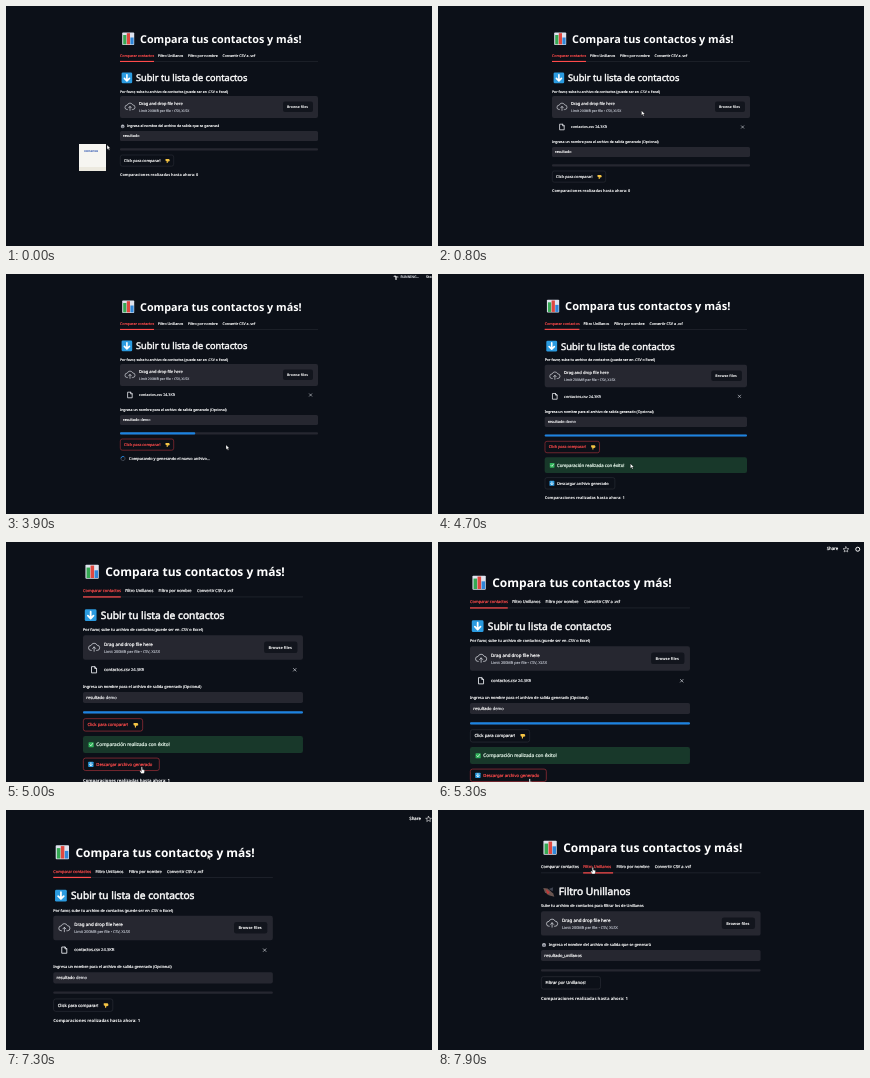
Animation of 426x240 px, one loop 8 s. Source, as an HTML page:

```html
<!DOCTYPE html>
<html lang="es">
<head>
<meta charset="utf-8">
<title>Compara tus contactos</title>
<style>
  html, body { margin: 0; width: 100%; height: 100%; overflow: hidden; background: #0c1018; }
  svg { display: block; width: 100%; height: 100%; }
  text { font-family: "Noto Sans", "Open Sans", sans-serif; text-rendering: geometricPrecision; white-space: pre; }
</style>
</head>
<body>
<svg id="stage" viewBox="0 0 426 240"></svg>
<script>
const LOOP = 8000, STEP = 100;
const LEFT = 114, WIDTH = 198, TOP = 33;
const BG = '#0c1018', PANEL = '#262730', LINE = '#2b2e37';
const WHITE = '#fff', GREY = '#b4b8c2', RED = '#ff4b4b', DARK_RED = '#a8323a', BLUE = '#1c83e1';
const stage = document.getElementById('stage');

// time, then the values at that time
const cameraKeys = [
  [4600, 114, 33, 1], [4950, 77, 30, 1.111], [5050, 77, 30, 1.111],
  [5300, 32, 41, 1.111], [5600, 17, 45, 1.109], [6900, 17, 45, 1.109], [7900, 103, 38, 1.109]
];
const pointerKeys = [
  [0, 101, 139], [600, 200, 104], [1100, 210, 106], [1700, 141, 146], [2700, 141, 146],
  [3200, 145, 171], [3450, 145, 171], [3850, 220, 171], [4500, 220, 171],
  [4950, 167, 209], [5450, 168, 210], [6300, 395, 9], [6900, 395, 9], [7600, 160.8, 51]
];

const within = (t, a, b) => t >= a && t < b;
const clamp = v => Math.max(0, Math.min(1, v));

function tween(keys, t) {
  const next = keys.findIndex(k => k[0] > t);
  if (next === 0) return keys[0].slice(1);
  if (next < 0) return keys[keys.length - 1].slice(1);
  const a = keys[next - 1], b = keys[next];
  const p = (t - a[0]) / (b[0] - a[0]), e = p * p * (3 - 2 * p);
  return a.slice(1).map((v, i) => v + (b[i + 1] - v) * e);
}

const rect = (x, y, w, h, fill, rx = 0, stroke = 'none') =>
  `<rect x="${x}" y="${y}" width="${w}" height="${h}" rx="${rx}" fill="${fill}" stroke="${stroke}" stroke-width=".6"/>`;
const path = (d, fill, stroke = 'none', width = .7) =>
  `<path d="${d}" fill="${fill}" stroke="${stroke}" stroke-width="${width}" stroke-linejoin="round" stroke-linecap="round"/>`;
// a thin outline gives regular text a medium weight
const text = (x, y, str, size = 3.5, fill = WHITE, weight = 400) =>
  `<text x="${x}" y="${y}" font-size="${size}" fill="${fill}" font-weight="${weight}" stroke="${fill}" stroke-width="${weight > 400 ? 0 : size * .045}">${str}</text>`;
const at = (x, y, body, scale = 1) => `<g transform="translate(${x} ${y}) scale(${scale})">${body}</g>`;

const chartIcon = () => rect(116.2, 26.4, 12, 12.6, '#dfe3ee', .8) +
  rect(117.2, 29, 3.2, 9.4, '#35a853') + rect(120.8, 27.2, 3.2, 11.2, '#e0473f') + rect(124.4, 31.5, 3.2, 6.9, '#2f86d8');

const arrowIcon = (x, y, size) => at(x, y, rect(0, 0, 10, 10, '#2b9be0', 1.2) +
  path('M5 2V7.6M2.6 5.4L5 7.8L7.4 5.4', 'none', '#fff', 1.5), size / 10);

const birdIcon = () => path('M116 69L120 69.5L125 74L126 77L121 75.5L117.5 73Z', '#6a5550') +
  path('M118 70L122 73L120 75Z', '#c23a3a') + path('M121 70L125 68.5L124.5 72Z', '#3f4350');

const pointingHand = (x, y) =>
  at(x, y, path('M-2-1.6H1.4Q2.4-1.2 2.2 .4L1 1H.2V2.4H-.8V.8L-2 .2Z', '#f6c544'));

const cloudIcon = () => at(124, 101, path('M-3 3H-3.4A2.6 2.6 0 0 1-3.2-2.2A3.4 3.4 0 0 1 3.2-2.4A2.7 2.7 0 0 1 3.2 3H2.6M0 4V-.6M-1.6 1L0-.7L1.6 1',
  'none', '#d5d8de', .8), .85);

const fileIcon = (x, y) =>
  at(x, y, path('M-2-2.8H.6L2.2-1.2V2.8H-2ZM.6-2.8V-1.2H2.2', 'none', '#e6e8ec', .8));

const cross = (x, y, r = 1.2) =>
  path(`M${x - r} ${y - r}L${x + r} ${y + r}M${x + r} ${y - r}L${x - r} ${y + r}`, 'none', '#d5d8de', .6);

function button(y, w, label, hot, textX = 4) {
  return rect(LEFT + .3, y, w - .6, 11.2, BG, 2, hot ? DARK_RED : LINE) +
    text(LEFT + textX, y + 7, label, 3.8, hot ? RED : WHITE);
}

function tabs(active) {
  const items = [['Comparar contactos', 114, 34], ['Filtro Unillanos', 152, 27],
    ['Filtro por nombre', 182, 30], ['Convertir CSV a .vcf', 216.5, 32]];
  const [, x, w] = items[active];
  return rect(LEFT, 55.2, WIDTH, .5, LINE) + rect(x, 54.9, w, 1.1, RED) +
    items.map(([label, left], i) => text(left, 51.3, label, 3.6, i === active ? RED : WHITE)).join('');
}

function uploader(label) {
  return text(LEFT, 86.5, label) + rect(LEFT, 90, WIDTH, 22, PANEL, 2) + cloudIcon() +
    text(133, 99.4, 'Drag and drop file here', 4) +
    text(133, 105.6, 'Limit 200MB per file • CSV, XLSX', 3.4, GREY) +
    rect(277, 95.6, 30, 10.4, '#12151d', 2) + text(281, 102.2, 'Browse files', 3.5, WHITE, 700);
}

function nameField(y, t, filter, uploaded) {
  const focus = within(t, 1800, 2800);
  const suffix = ' demo'.slice(0, Math.max(0, Math.floor((t - 2200) / 100)));
  const caret = focus && (t % 1000 < 500) ? '<tspan fill="#fff"> |</tspan>' : '';
  const value = filter ? 'resultado_unillanos' : `resultado<tspan fill="#b9bdc7">${suffix}</tspan>${caret}`;
  const label = uploaded
    ? text(LEFT, y - 3.6, 'Ingresa un nombre para el archivo de salida generado (Opcional)')
    : `<circle cx="116.7" cy="${y - 4.6}" r="1.8" fill="#b7bac2"/>` + rect(115.6, y - 5, 2.2, 2, '#777b86') +
      text(121, y - 3.6, 'Ingresa el nombre del archivo de salida que se generará');
  return label + rect(LEFT, y, WIDTH, 10, PANEL, 1.6, focus ? DARK_RED : 'none') +
    text(117, y + 6.3, value, 3.7) + (focus ? text(284, y + 8.8, 'Press Enter to apply', 2.8, GREY) : '');
}

function header(t) {
  const running = within(t, 1000, 1400) || within(t, 2800, 3100) || within(t, 3400, 4600) || within(t, 5500, 5900);
  const lean = t % 400 < 200 ? 1 : -1;
  const status = path(`M${389 - lean} 5.5L390 3L${390 + lean} 1.5M388 2.5L392 3M390 3L${391 + lean} 5.5`, 'none', WHITE, .7) +
    text(394.5, 4.2, 'RUNNING...', 3.4, '#d5d8de') + text(420, 4.2, 'Stop', 3.6, WHITE, 700);
  return (running ? status : '') + text(435, 3.7, 'Share', 3.9) +
    path('M452.4 .4L453.2 2L455 2.2L453.6 3.3L454 5L452.4 4.1L450.8 5L451.2 3.3L449.8 2.2L451.6 2Z', 'none', WHITE, .5) +
    `<circle cx="463" cy="2.6" r="1.8" fill="none" stroke="#fff" stroke-width=".9"/>` +
    [.8, 2.6, 4.4].map(y => `<circle cx="472" cy="${y}" r=".5" fill="#fff"/>`).join('');
}

function results(t, y) {
  const counter = lineY => text(LEFT, lineY, `Comparaciones realizadas hasta ahora: ${t < 4600 ? 0 : 1}`, 3.85, WHITE, 700);
  if (within(t, 3500, 4600)) {
    const spin = `<g transform="rotate(${t * .72} 117 ${y})"><circle cx="117" cy="${y}" r="2.1" fill="none" stroke="#454a55" stroke-width=".8"/>` +
      path(`M117 ${y - 2.1}A2.1 2.1 0 0 1 119.1 ${y}`, 'none', BLUE, .8) + '</g>';
    return spin + text(123, y + 1.3, 'Comparando y generando el nuevo archivo...', 3.85);
  }
  if (within(t, 4600, 5600)) {
    return rect(LEFT, 180.7, WIDTH, 15.3, '#18382a', 2) + rect(119, 186.2, 4.6, 4.6, '#2fb45a', .6) +
      path('M120.1 188.5L121.1 189.5L122.6 187.4', 'none', '#fff', .6) +
      text(126, 190, 'Comparación realizada con éxito!', 4.25, '#e8f8ed') +
      button(200.5, 69, 'Descargar archivo generado', t >= 4900, 12) + arrowIcon(118.7, 203.7, 4.8) + counter(221.6);
  }
  return counter(y + 1.3);
}

function content(t) {
  const filter = t >= 7700, uploaded = within(t, 700, 7700), shift = uploaded ? 16 : 0;
  const progress = within(t, 3500, 5600) ? clamp((t - 3520) / 1000) : 0;
  const barY = 142.3 + shift;
  return chartIcon() + text(134, 36.8, 'Compara tus contactos y más!', 10.8, WHITE, 700) + tabs(filter ? 1 : 0) +
    (filter ? birdIcon() : arrowIcon(115.6, 66.6, 10.6)) +
    text(130, 75.2, filter ? 'Filtro Unillanos' : 'Subir tu lista de contactos', 9.2) +
    uploader(filter ? 'Sube tu archivo de contactos para filtrar los de Unillanos'
      : 'Por favor, sube tu archivo de contactos (puede ser en .CSV o Excel)') +
    (uploaded ? fileIcon(124, 121) + text(133, 122.2, 'contactos.csv <tspan fill="#b4b8c2">24.3KB</tspan>', 3.7) + cross(304.6, 121) : '') +
    nameField(125 + shift, t, filter, uploaded) +
    rect(LEFT, barY, WIDTH, 2.1, PANEL, 1) +
    (progress ? rect(LEFT, barY, WIDTH * progress, 2.1, BLUE, 1) : '') +
    button(149 + shift, 54, filter ? 'Filtrar por Unillanos!' : 'Click para comparar!', within(t, 3200, 5200)) +
    (filter ? '' : pointingHand(161.5, 154.5 + shift)) +
    results(t, 168.5 + shift);
}

const downloadPopup = () => rect(371.6, -8, 89.5, 17.6, '#1e2128', 1.5) +
  rect(376, -3.4, 4.4, 5.6, '#f1f1f1', .4) + path('M377-1.2H379.4M377 .4H379.4', 'none', '#555', .5) +
  text(387, 0, 'resultado demo.csv', 3.6, WHITE, 700) + text(387, 4.4, '12.4 KB • Listo', 3.2, '#b9c6dc') +
  path('M439.5-2.5H441L441.6-1.8H443V1H439.5Z', 'none', '#d5d8de', .5) + cross(452, -1);

function pointer(t) {
  const [x, y] = tween(pointerKeys, t);
  const hand = within(t, 3100, 3550) || within(t, 4900, 5600) || t >= 7500;
  const shape = within(t, 1600, 2800)
    ? path('M-1-2.2H1M0-2.2V2.2M-1 2.2H1', 'none', '#fff', .6)
    : hand ? path('M-.6-.4Q0-1 .5-.3V1.8L2.4 2.3L2.3 4.2L1.7 5.4H-.7L-2 3.2L-1.4 2.7L-.6 3.3Z', '#fff', '#111', .3)
    : path('M0 0V4.6L1.1 3.6L1.9 5.3L2.7 4.9L1.9 3.3H3.3Z', '#fff', '#111', .3);
  const ghost = t < 700
    ? rect(-28, -1, 27, 27, '#f6f5f1') + rect(-28, 22, 27, 4, '#ece9df') + text(-23, 7.2, 'contactos', 3.1, '#3f62b5')
    : '';
  return at(x, y, ghost + shape);
}

function draw(t) {
  const [x, y, s] = tween(cameraKeys, t);
  stage.innerHTML = rect(0, 0, 426, 240, BG) +
    `<g transform="translate(${x} ${y}) scale(${s}) translate(${-LEFT} ${-TOP})">` +
    rect(-100, -40, 700, 33.3, '#c9b795') + header(t) + content(t) +
    (within(t, 5900, 7000) ? downloadPopup() : '') + pointer(t) + '</g>';
}

const start = performance.now();
let shown = -1;
function tick(now) {
  const t = Math.floor(Math.max(0, now - start) % LOOP / STEP) * STEP;
  if (t !== shown) draw(shown = t);
  requestAnimationFrame(tick);
}
draw(0);
requestAnimationFrame(tick);
</script>
</body>
</html>
```
